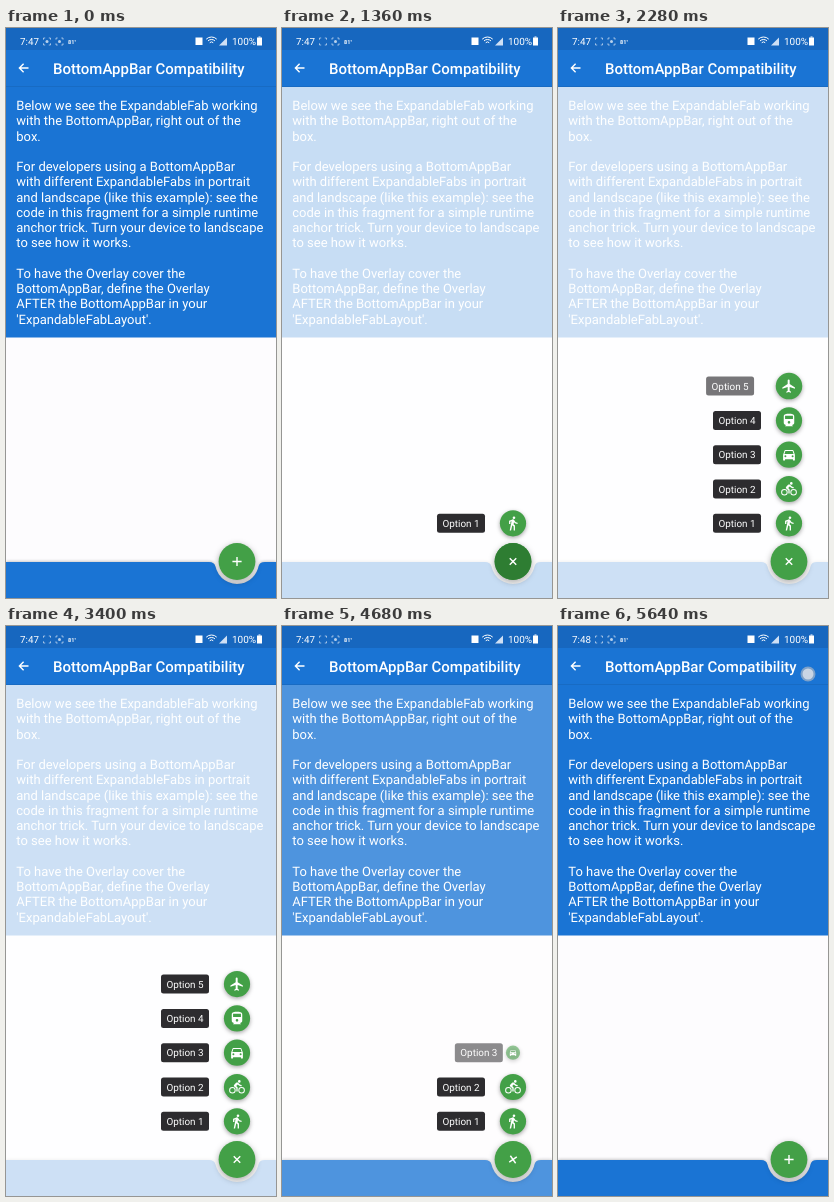
An HTML page with a canvas that plays this animation: 270x570 px, repeating every 5680 ms.

```html
<!DOCTYPE html>
<html lang="en">
<head>
<meta charset="utf-8">
<title>Expandable button</title>
<style>
  html, body { margin: 0; width: 100%; height: 100%; overflow: hidden; background: #fdfcfe; }
  canvas { display: block; width: 270px; height: 570px; }
</style>
</head>
<body>
<canvas id="stage" width="270" height="570"></canvas>
<script>
const ctx = document.getElementById('stage').getContext('2d');
ctx.textRendering = 'geometricPrecision';
const LOOP = 5680, TAU = Math.PI * 2;
const BLUE = '#1a74d4', GREEN = '#43a047', PRESSED = '#2e7d32', PAGE = '#fdfcfe';
const FAB = { x: 231, y: 533.5, r: 18.4 };
const BAR_TOP = 534;

const BODY = [
  'Below we see the ExpandableFab working', 'with the BottomAppBar, right out of the', 'box.', '',
  'For developers using a BottomAppBar', 'with different ExpandableFabs in portrait',
  'and landscape (like this example): see the', 'code in this fragment for a simple runtime',
  'anchor trick. Turn your device to landscape', 'to see how it works.', '',
  'To have the Overlay cover the', 'BottomAppBar, define the Overlay',
  'AFTER the BottomAppBar in your', "'ExpandableFabLayout'."
];

const ring = (x, y, r) => `M${x - r} ${y}a${r} ${r} 0 1 0 ${2 * r} 0a${r} ${r} 0 1 0 ${-2 * r} 0z`;
// Icons on a 24 x 24 grid, lowest option first.
const ICONS = [
  ring(13.5, 3.5, 2) + 'M9.8 8.9L7 23h2.1l1.8-8 2.1 2v6h2v-7.5l-2.1-2 .6-3C14.8 12 16.8 13 19 13v-2c-1.9 0-3.5-1-4.3-2.4l-1-1.6c-.4-.6-1-1-1.7-1-.3 0-.5.1-.8.1L6 8.3V13h2V9.6z',
  ring(15.5, 3.5, 2) + [5, 19].map(x => ring(x, 17, 5) + ring(x, 17, 3.5)).join('') +
    'M10.8 10.5l2.4-2.4.8.8c1.3 1.3 3 2.1 5.1 2.1V9c-1.5 0-2.7-.6-3.6-1.5l-1.9-1.9c-.9-.8-2.2-.8-3 0L7.8 8.4c-.8.8-.8 2 0 2.8L11 14v5h2v-6.2z',
  'M18.9 6C18.7 5.4 18.2 5 17.5 5h-11C5.8 5 5.3 5.4 5.1 6L3 12v8q0 1 1 1h1q1 0 1-1v-1h12v1q0 1 1 1h1q1 0 1-1v-8zM5 11l1.5-4.5h11L19 11z' +
    ring(6.5, 14.5, 1.5) + ring(17.5, 14.5, 1.5),
  'M12 2c-4 0-8 .5-8 4v9.5C4 17.4 5.6 19 7.5 19L6 20.5v.5h12v-.5L16.5 19c1.9 0 3.5-1.6 3.5-3.5V6c0-3.5-4-4-8-4zM18 10H6V5h12z' + ring(12, 15, 2),
  'M21 16v-2l-8-5V3.5a1.5 1.5 0 0 0-3 0V9l-8 5v2l8-2.5V19l-2 1.5V22l3.5-1 3.5 1v-1.5L13 19v-5.5z'
].map(d => new Path2D(d));

const span = (t, start, length) => Math.min(1, Math.max(0, (t - start) / length));
const ease = p => (1 - Math.cos(Math.PI * p)) / 2;
const overshoot = p => (p - 1) ** 2 * (4.5 * (p - 1) + 3.5) + 1;

function layer(draw, { x = 0, y = 0, scale = 1, angle = 0, alpha = 1 } = {}) {
  ctx.save();
  ctx.translate(x, y);
  ctx.rotate(angle);
  ctx.scale(scale, scale);
  ctx.globalAlpha = alpha;
  draw();
  ctx.restore();
}

function shadow(blur, dy, strength) {
  ctx.shadowColor = `rgba(0,0,0,${strength})`;
  ctx.shadowBlur = blur;
  ctx.shadowOffsetY = dy;
}

function rect(color, x, y, w, h) {
  ctx.fillStyle = color;
  ctx.fillRect(x, y, w, h);
}

function disc(color, x, y, r) {
  ctx.fillStyle = color;
  ctx.beginPath();
  ctx.arc(x, y, r, 0, TAU);
  ctx.fill();
}

function lines(width, ...paths) {
  ctx.strokeStyle = '#fff';
  ctx.lineWidth = width;
  ctx.beginPath();
  for (const [first, ...rest] of paths) {
    ctx.moveTo(...first);
    rest.forEach(p => ctx.lineTo(...p));
  }
  ctx.stroke();
}

function text(string, x, y, size, weight = 400, align = 'left') {
  ctx.font = `${weight} ${size}px Roboto, sans-serif`;
  ctx.textAlign = align;
  ctx.fillStyle = '#fff';
  ctx.fillText(string, x, y);
}

function captureIcon(x, filled) {
  layer(() => {
    for (const sx of [-1, 1]) for (const sy of [-1, 1])
      lines(0.8, [[sx * 3.5, sy * 1.8], [sx * 3.5, sy * 3.5], [sx * 1.8, sy * 3.5]]);
    if (filled) disc('#fff', 0, 0, 1.5);
  }, { x, y: 13.5, alpha: 0.7 });
}

function statusBar(t) {
  rect('#1767bf', 0, 0, 270, 22);
  text(t < 5280 ? '7:47' : '7:48', 14, 17, 9.8);
  captureIcon(41, t < 1280);
  captureIcon(53.5, true);
  text('81°', 62, 15.5, 5.5, 700);
  rect('#fff', 189.5, 9.5, 7, 7.5);
  for (const r of [2.5, 5, 7.5]) {
    ctx.lineWidth = 1;
    ctx.strokeStyle = '#fff';
    ctx.beginPath();
    ctx.arc(205.5, 16.5, r, -2.35, -0.8);
    ctx.stroke();
  }
  ctx.fillStyle = '#cfe0f5';
  ctx.fill(new Path2D('M213 17.5h8v-8z'));
  text('100%', 226, 17, 10);
  rect('#fff', 251, 9.5, 5, 8);
  rect('#fff', 252.5, 8.5, 2, 1);
}

function header(t) {
  rect(BLUE, 0, 0, 270, 59);
  rect('rgba(0,0,0,0.08)', 0, 58, 270, 1);
  statusBar(t);
  lines(1.4, [[22.5, 40], [13.5, 40]], [[17.6, 35.8], [13.4, 40], [17.6, 44.2]]);
  text('BottomAppBar Compatibility', 47, 45.5, 15, 500);
}

function page() {
  rect(PAGE, 0, 0, 270, 570);
  rect(BLUE, 0, 59, 270, 250.5);
  BODY.forEach((line, i) => text(line, 10.3, 82.2 + i * 15.25, 13));
  layer(() => {
    shadow(3, -1, 0.2);
    ctx.fillStyle = BLUE;
    ctx.beginPath();
    ctx.moveTo(0, BAR_TOP);
    ctx.lineTo(203, BAR_TOP);
    ctx.quadraticCurveTo(208.5, BAR_TOP, 209.4, BAR_TOP + 4.5);
    ctx.arc(FAB.x, BAR_TOP, 22, Math.PI - 0.2, 0.2, true);
    ctx.quadraticCurveTo(253.5, BAR_TOP, 259, BAR_TOP);
    ctx.lineTo(270, BAR_TOP);
    ctx.lineTo(270, 570);
    ctx.lineTo(0, 570);
    ctx.fill();
  });
}

// White glyphs stay opaque: over the white page they fade together with their backing.
function option(i, t) {
  const grow = span(t, 1122 + i * 257, 140);
  const slide = span(t, 1105 + i * 257, 250);
  const hide = span(t, 4450 + (4 - i) * 94, 94);
  if (hide === 1) return;
  const y = 495.3 - i * 34.3;

  if (grow > 0) layer(() => {
    layer(() => {
      shadow(4, 1.5, 0.35);
      disc(GREEN, 0, 0, 13.1);
    }, { alpha: ease(grow) * (1 - hide) });
    ctx.scale(0.656, 0.656);
    ctx.translate(-12, -12);
    ctx.fillStyle = '#fff';
    ctx.fill(ICONS[i], 'evenodd');
  }, { x: FAB.x, y, scale: Math.max(0, overshoot(grow)) * (1 - hide) });

  if (slide > 0) layer(() => {
    ctx.fillStyle = '#2d2c2f';
    ctx.beginPath();
    ctx.roundRect(-24, -9.5, 48, 19, 2.5);
    ctx.fill();
    ctx.globalAlpha = 1;
    text('Option ' + (i + 1), 0, 3.6, 9.9, 400, 'center');
  }, { x: 179 + 25 * (1 - overshoot(slide)) + 39 * hide, y, alpha: ease(slide) * (1 - hide) });
}

function mainButton(t) {
  const turn = ease(span(t, 1110, 250)) - ease(span(t, 4450, 350));
  const pressed = span(t, 1000, 100) * (1 - span(t, 1420, 200));
  layer(() => {
    shadow(6, 2, 0.35);
    disc(GREEN, FAB.x, FAB.y, FAB.r);
  });
  layer(() => disc(PRESSED, FAB.x, FAB.y, FAB.r), { alpha: pressed });
  layer(() => lines(1.4, [[-4.6, 0], [4.6, 0]], [[0, -4.6], [0, 4.6]]),
    { x: FAB.x, y: FAB.y, angle: -0.75 * Math.PI * turn });
}

function touch(t, start, end, x, y, alpha) {
  if (t < start || t >= end) return;
  layer(() => {
    disc('#9fb0c6', x, y, 7.5);
    disc('#e3e7ec', x, y, 5.5);
  }, { alpha });
}

function draw(now) {
  const t = now % LOOP;
  page();
  const veil = 0.78 * (ease(span(t, 1165, 220)) - ease(span(t, 4490, 300)));
  layer(() => rect('#fff', 0, 59, 270, 511), { alpha: Math.max(0, veil) });
  header(t);
  mainButton(t);
  for (let i = 0; i < 5; i++) option(i, t);
  touch(t, 1000, 1280, 232, 531, 0.2);
  touch(t, 4240, 4560, 190, 356, 0.75);
  touch(t, 5560, LOOP, 250, 48, 0.75);
  requestAnimationFrame(draw);
}
requestAnimationFrame(draw);
</script>
</body>
</html>
```
